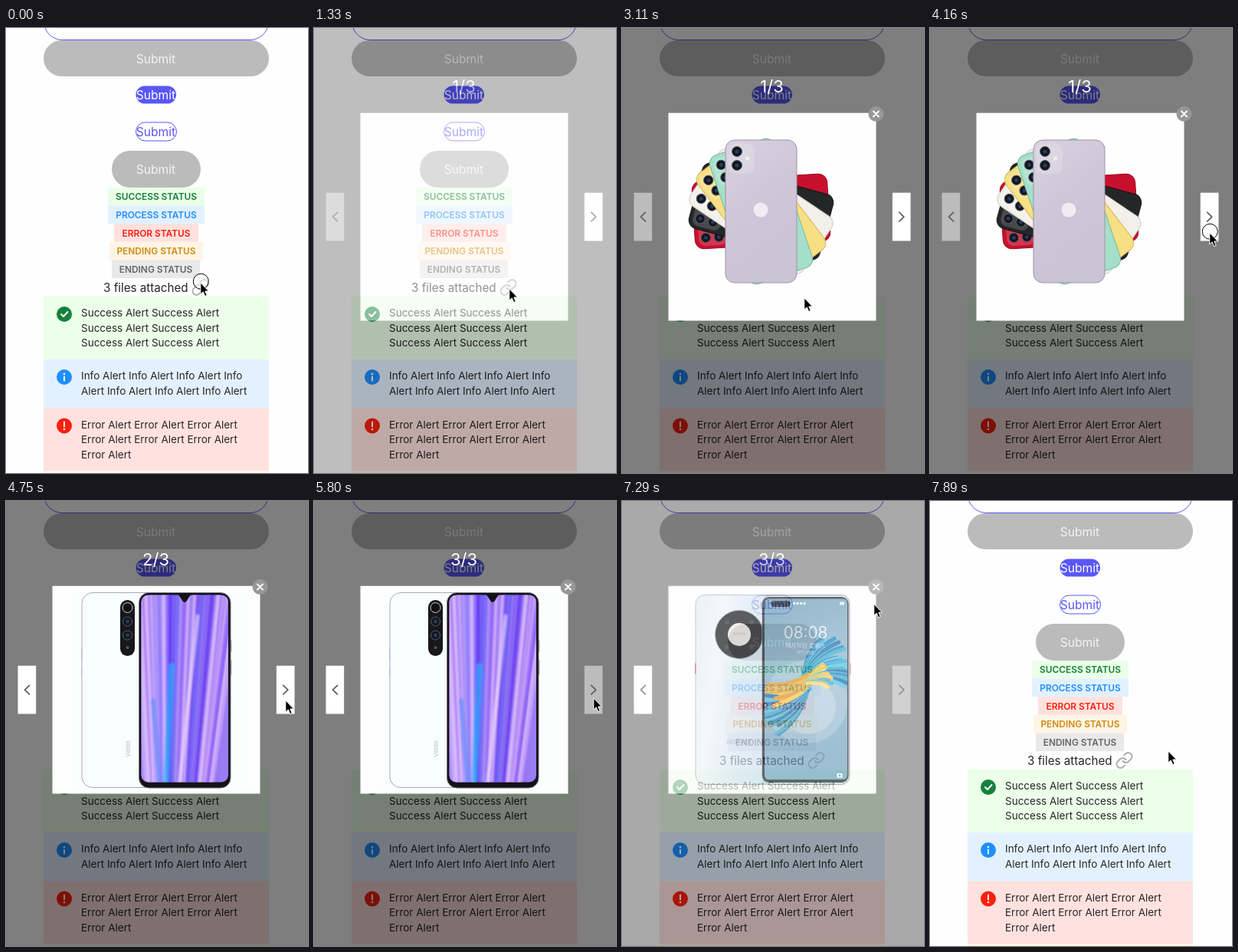
These frames come from a looping animation (394 px wide and 580 px high, 8 s). An HTML page:

```html
<!DOCTYPE html>
<html lang="en">
<head>
<meta charset="utf-8">
<title>Attachment viewer</title>
<style>
html, body { margin: 0; width: 100%; height: 100%; overflow: hidden; background: #fefefe; }
svg { display: block; font-family: Inter, "Noto Sans CJK SC", sans-serif; }
.mid { text-anchor: middle; }
.line { fill: none; stroke-linecap: round; stroke-linejoin: round; }
</style>
</head>
<body>
<svg id="stage" width="394" height="580" viewBox="0 0 394 580"></svg>
<script>
const LOOP = 8000, STEP = 148.5;
const stage = document.getElementById('stage');
const $ = id => document.getElementById(id);

const box = (x, y, w, h, fill, r = 0, more = '') =>
  `<rect x="${x}" y="${y}" width="${w}" height="${h}" rx="${r}" fill="${fill}" ${more}/>`;
const dot = (x, y, r, fill, more = '') => `<circle cx="${x}" cy="${y}" r="${r}" fill="${fill}" ${more}/>`;
const label = (x, y, size, fill, text, more = 'class="mid"') =>
  `<text x="${x}" y="${y}" font-size="${size}" fill="${fill}" ${more}>${text}</text>`;
const line = (d, color, width, more = '') =>
  `<path class="line" d="${d}" stroke="${color}" stroke-width="${width}" ${more}/>`;
const times = (n, make) => Array.from({ length: n }, (_, i) => make(i)).join('');
const noise = i => { const v = Math.sin(i * 127.1 + 3.7) * 43758.5; return v - Math.floor(v); };

const submit = (y, fill) => label(195.5, y, 15.6, fill, 'Submit');

const tag = ([text, x, w, ink, paper], i) =>
  box(x, 208 + i * 23.6, w, 23.6, paper) +
  label(x + w / 2, 224.4 + i * 23.6, 11.9, ink, text + ' STATUS', 'class="mid" font-weight="600"');

const alertBox = (y, h, paper, ink, glyph, lines) =>
  box(49, y, 294, h, paper) + dot(76, y + 23, 10, ink) +
  `<g transform="translate(76 ${y + 23})">${glyph}</g>` +
  lines.map((s, i) => label(98, y + 26 + i * 19.7, 13.5, '#262626', s, '')).join('');

const page = () =>
  box(49.5, -40, 293, 55.5, '#fff', 24, 'stroke="#5a55f4"') +
  box(49, 16, 294, 47, '#bbb', 23.5) + submit(45.5, '#f3f3f3') +
  box(169.5, 75.5, 52.5, 23, '#5957fb', 11.5) + submit(93, '#fff') +
  box(169.5, 123, 53, 24, '#fff', 12, 'stroke="#5a55f4"') + submit(140.8, '#5a55f4') +
  box(138, 160, 116, 48, '#bbb', 24) + submit(190, '#f3f3f3') +
  [['SUCCESS', 133, 126, '#16803c', '#eaffe8'],
   ['PROCESS', 133, 126, '#1f8fff', '#e2f1ff'],
   ['ERROR', 141, 110, '#fc2010', '#ffe1de'],
   ['PENDING', 135, 122, '#d18a0e', '#fff5e6'],
   ['ENDING', 138, 115, '#666', '#e9e9e9']].map(tag).join('') +
  label(127, 343.8, 15.2, '#262626', '3 files attached', '') +
  line('M10 13a5 5 0 0 0 7.54.54l3-3a5 5 0 0 0-7.07-7.07l-1.72 1.71M14 11a5 5 0 0 0-7.54-.54l-3 3a5 5 0 0 0 7.07 7.07l1.71-1.71',
    '#b0b0b0', 2.1, 'transform="translate(241.5 326)"') +
  alertBox(350, 82, '#ecffe9', '#16803c', line('M-4 0L-1 3L4.5-3', '#fff', 2),
    Array(3).fill('Success Alert Success Alert')) +
  alertBox(432, 63.5, '#e3f1ff', '#1f8fff', dot(0, -4, 1.3, '#fff') + line('M0-.5V4.5', '#fff', 2),
    ['Info Alert Info Alert Info Alert Info', 'Alert Info Alert Info Alert Info Alert']) +
  alertBox(495.5, 81.5, '#ffe2df', '#fc1f0c', dot(0, 4.5, 1.3, '#fff') + line('M0-5V1', '#fff', 2),
    ['Error Alert Error Alert Error Alert', 'Error Alert Error Alert Error Alert', 'Error Alert']) +
  box(49, 577, 294, 3, '#fff5e6');

// Fan of coloured phones behind a lilac one
const lens = (x, y, r) => dot(x, y, r, '#14161c', 'stroke="#555b66"') + dot(x, y, r * .4, '#273a66');
const fanned = (color, edge, angle, size) =>
  `<g transform="translate(181.5 239) rotate(${angle}) scale(${size})">` +
  box(-46.5, -93, 93, 186, color, 12, `stroke="${edge}"`) +
  box(-42.5, -88, 34, 39, '#fff', 9, 'fill-opacity=".16"') +
  lens(-31.5, -78, 6.5) + lens(-31.5, -60, 6.5) + dot(-18, -69, 2.5, '#f6efe6') + '</g>';
const photoFan = () =>
  [['#c8102e', '#96091f'], ['#252627', '#111'], ['#f3f0ea', '#cfcac2'], ['#f7df83', '#cdb45a'], ['#a5dfc9', '#79b9a2']]
    .map(([color, edge], i) => fanned(color, edge, (i - 5) * 18.7, .95)).join('') +
  fanned('url(#lilac)', '#9d93a8', 0, 1) +
  dot(181, 237, 9.5, '#efecf2');

// White back and a front with soft streaks of light
const streak = i => {
  const foot = 150 + i * 1.7 + noise(i) * 6;
  const top = 210 + (foot - 210) * 1.6;
  const color = ['#5b2bf0', '#d9c2ff', '#f1dcff', '#4a55f5', '#a884ff', '#e3b9fa', '#7f48ee'][Math.floor(noise(i + 50) * 7)];
  return line(`M${foot} 372L${top} 118`, color, 1.5 + noise(i + 90) * 4, 'opacity=".5"');
};
const photoStreaks = () =>
  box(85, 112, 238, 268, '#fcfefe') +
  box(99, 119.5, 110, 254, '#f8fdfd', 14, 'stroke="#aaa8b8"') +
  line('M98.5 193V208M98.5 217V226', '#c3b5ec', 1) +
  box(149, 129, 19, 73, '#17171b', 9.5) +
  dot(158.5, 139, 6.5, '#101014', 'stroke="#c9c9cf"') + lens(158.5, 157, 6) + lens(158.5, 175, 6) + dot(158.5, 191, 2, '#555') +
  label(0, 0, 8, '#b9bec6', 'Veldo', 'class="mid" transform="translate(161.5 323) rotate(-90)"') +
  box(173.5, 119.5, 119.5, 254.5, '#121218', 13, 'stroke="#777783"') +
  line('M293.7 182V196M293.7 208V226', '#777783', 1) +
  `<g clip-path="url(#screenA)">${box(176, 122, 115, 245, 'url(#violet)')}` +
  `<g style="filter:blur(.9px)">${times(70, streak)}` +
  line('M209 372L216 215', '#28b4fa', 8, 'opacity=".65"') + line('M201 372L192 260', '#4a8cff', 6, 'opacity=".5"') +
  line('M226 372L250 150', '#f3e2ff', 5, 'opacity=".6"') + '</g></g>' +
  '<path d="M222 121C228 122 229 132 233 132S238 122 244 121Z" fill="#121218"/>';

// Pale blue back and a front with a feathered wallpaper
const plume = (x, y, from, sweep, size, colors) => times(24, i => {
  const a = (from + sweep * i / 23) * Math.PI / 180, r = size * (.75 + .25 * noise(i + x));
  const at = (angle, k) => `${x + Math.cos(angle) * r * k} ${y + Math.sin(angle) * r * k}`;
  return line(`M${x} ${y}Q${at(a - .35, .6)} ${at(a, 1)}`, colors[i % colors.length], 5);
});
const photoFeather = () =>
  box(96, 122.5, 110, 247, 'url(#ice)', 12, 'stroke="#a9b2bd"') +
  line('M95.8 212V225M297.6 212V225', '#d9605c', 1.6) +
  dot(153, 174, 31.5, '#0c0d11', 'stroke="#8e949c"') + dot(153, 174, 15, '#e9e7e6') +
  [[-16, -16], [16, -16], [16, 16], [-16, 16]].map(([x, y]) => dot(153 + x, 174 + y, 3, '#1d2534')).join('') +
  box(145, 171.5, 16, 3, '#d5d2d0') +
  label(153, 316.5, 8, '#a3b1c0', 'NORVEX') +
  box(183, 122.5, 114, 247, '#d5dae0', 11, 'stroke="#89929c"') +
  box(183, 125, 112.5, 242, '#16202b', 9) +
  `<g clip-path="url(#screenB)">${box(186, 127, 108, 236, 'url(#sky)')}` +
  dot(240, 262, 54, '#a9c7da', 'opacity=".55"') + dot(243, 268, 36, '#c4d8e5', 'opacity=".55"') +
  plume(244, 240, 122, 46, 78, ['#1478b8', '#2fa4cf', '#45c0e0', '#0e6aa8']) +
  plume(236, 234, -66, 74, 70, ['#1478b8', '#2ba6d2', '#0e6aa8', '#45c0e0']) +
  plume(262, 214, 136, 26, 86, ['#f3b02c', '#fbd04a', '#e9951d']) +
  plume(242, 238, -50, 60, 32, ['#f9b92f', '#2ba6d2', '#fbdc6a']) + '</g>' +
  box(194.5, 130, 25, 8, '#101820', 4) + times(4, i => box(223 + i * 4.5, 132, 3, 3, '#e6f0f6')) + box(284, 131.5, 6, 4, '#e6f0f6', 1) +
  label(239.5, 179, 21, '#fff', '08:08', 'class="mid" font-weight="300"') +
  label(239, 191, 7, '#e8f2f7', '10月10日 星期六') + label(239, 199, 5, '#dcebf3', '18°C 晴朗') +
  box(280.5, 355, 7, 5.5, '#fff', 1) + dot(284, 357.8, 1.5, '#5d94b5');

const arrow = (id, x, dir) =>
  `<g>${box(x, 214.7, 23.7, 62.8, '#fff', 0, `id="${id}"`)}` +
  line(`M${x + 12 - dir * 3} 240.3l${dir * 6} 5.8l${-dir * 6} 5.8`, '#616161', 1.8) + '</g>';

const gradient = (id, x2, y2, ...colors) =>
  `<linearGradient id="${id}" x2="${x2}" y2="${y2}">` +
  colors.map((c, i) => `<stop offset="${i / (colors.length - 1)}" stop-color="${c}"/>`).join('') + '</linearGradient>';

stage.innerHTML =
  '<defs>' + gradient('lilac', .4, 1, '#d9d2df', '#cfc7d8', '#cbc3d6') +
  gradient('violet', 1, .1, '#b088f6', '#9a7cf8', '#6f5cf6', '#a886f6', '#8a62f2', '#9a7cf5') +
  gradient('ice', 1, .3, '#e4ecf6', '#f0f4fa', '#d9e7f4', '#cfe1f0') +
  gradient('sky', .2, 1, '#5f93b0', '#86b1cb', '#6d9fbf') +
  `<clipPath id="screenA">${box(176.5, 122.5, 113.5, 244, '#000', 9)}</clipPath>` +
  `<clipPath id="screenB">${box(186, 127.5, 108, 236, '#000', 6)}</clipPath></defs>` +
  page() +
  '<g id="modal">' + box(0, 0, 394, 580, '#000', 0, 'opacity=".5"') +
  box(60.5, 110.7, 271, 270.8, '#fefefe') +
  [photoFan, photoStreaks, photoFeather].map((draw, i) => `<g id="photo${i + 1}">${draw()}</g>`).join('') +
  label(195.5, 83.7, 22, '#fff', '', 'class="mid" id="count"') +
  arrow('prev', 15.5, -1) + arrow('next', 352.8, 1) +
  '<g id="close">' + dot(331.5, 112, 10, '#979797') + line('M328 108.5l7 7m0-7l-7 7', '#fff', 2) + '</g></g>' +
  '<g id="cursor">' + dot(1.3, -.7, 10, '#fff', 'id="ring" fill-opacity=".5" stroke="#000"') +
  '<path d="M.8 1V16L4.2 12.9L6.7 18.6L9.2 17.5L6.8 12H11.5Z" fill="#000" stroke="#fff" stroke-width="1"/></g>';

const stops = [
  [0, 253, 331], [1, 253, 331], [4, 238, 352], [8, 254, 339], [18, 254, 339], [21, 237, 351], [22, 237, 351],
  [27, 364, 266], [29, 364, 266], [30, 364, 268], [31, 364, 268], [32, 364, 259], [33, 364, 256],
  [40, 364, 256], [46, 330, 111], [48, 330, 111], [53, 310, 325], [54, 310, 325]
];
const pressed = [[0, 1], [28, 28], [36, 36], [46, 48]];
const clamp = v => Math.max(0, Math.min(1, v));
const show = (id, on) => $(id).setAttribute('visibility', on ? 'inherit' : 'hidden');

function pointer(tick) {
  const i = Math.max(1, stops.findIndex(s => s[0] >= tick));
  const [t0, x0, y0] = stops[i - 1], [t1, x1, y1] = stops[i];
  const p = clamp((tick - t0) / (t1 - t0)), k = p * p * (3 - 2 * p);
  return [x0 + (x1 - x0) * k, y0 + (y1 - y0) * k];
}

function draw() {
  const tick = Math.floor((performance.now() % LOOP + 10) / STEP);
  const index = tick < 29 ? 1 : tick < 37 ? 2 : 3;
  const photo = tick < 18 ? 0 : tick < 32 ? 1 : tick < 42 ? 2 : 3;
  $('modal').setAttribute('opacity', clamp((tick - 8) / 2) * clamp((51 - tick) / 3));
  for (let i = 1; i < 4; i++) show('photo' + i, i === photo);
  $('count').textContent = index + '/3';
  $('prev').setAttribute('fill', index > 1 ? '#fff' : '#bcbcbc');
  $('next').setAttribute('fill', index < 3 ? '#fff' : '#bcbcbc');
  show('close', tick >= 14);
  show('ring', pressed.some(([a, b]) => tick >= a && tick <= b));
  $('cursor').setAttribute('transform', `translate(${pointer(tick)})`);
  requestAnimationFrame(draw);
}
draw();
</script>
</body>
</html>
```
